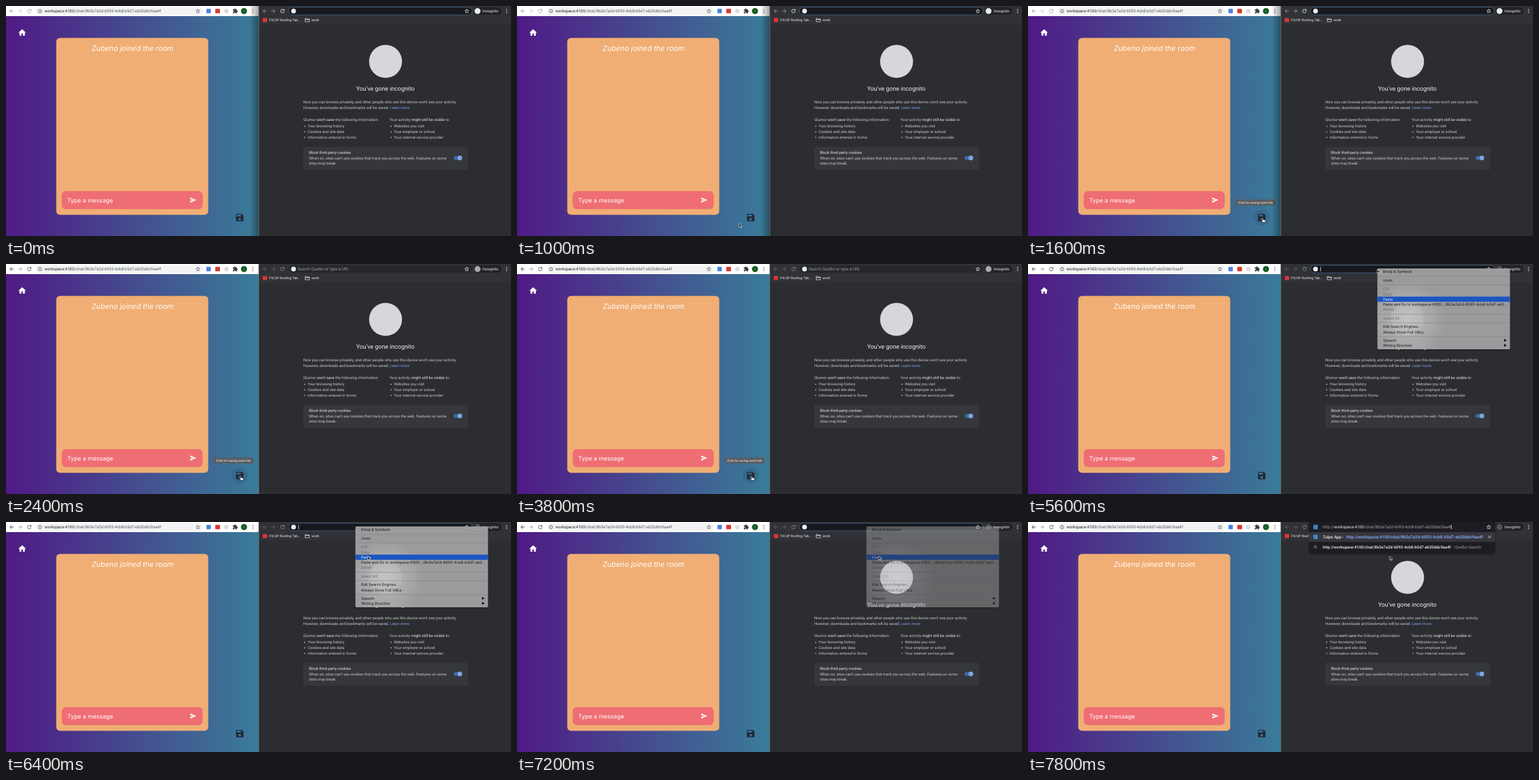
Animation of 800 by 364 pixels, one loop 8 s. Source, as an HTML page:

```html
<!DOCTYPE html>
<html lang="en">
<head>
<meta charset="utf-8">
<title>Sharing a room link</title>
<style>
  html, body { margin: 0; width: 100%; height: 100%; overflow: hidden; background: #2c2d31; }
  svg { display: block; width: 100%; height: 100%; }
  text { font: 6.04px Roboto, "Open Sans", sans-serif; fill: #c9cacd; text-rendering: geometricPrecision; white-space: pre; }
  .url { font-size: 6.48px; }
  .chat { font-family: Inter, Lato, sans-serif; fill: #fff; }
  .menu text { font: 5.85px Inter, Lato, sans-serif; fill: #111; }
  .menu .off { fill: #6d6d70; }
  .menu .on { fill: #fff; }
  .strong { fill: #eceef0; }
  .line { fill: none; stroke: currentColor; stroke-width: .8; }
  .icon { fill: currentColor; }
  #rightNav { --back: .5; }
</style>
</head>
<body>
<svg viewBox="0 0 800 364" preserveAspectRatio="none">
  <defs>
    <linearGradient id="sky"><stop stop-color="#501a85"/><stop offset="1" stop-color="#3a7c99"/></linearGradient>
    <linearGradient id="edge"><stop stop-opacity="0"/><stop offset="1" stop-opacity=".35"/></linearGradient>
    <radialGradient id="glass" gradientUnits="userSpaceOnUse" cx="601" cy="88" r="60">
      <stop stop-color="#c4c4c6"/><stop offset=".35" stop-color="#b8b8ba"/><stop offset="1" stop-color="#a0a0a2"/>
    </radialGradient>
    <filter id="shade" x="-20%" y="-20%" width="140%" height="140%">
      <feDropShadow dx="0" dy="1" stdDeviation="1.5" flood-opacity=".35"/>
    </filter>
    <path id="arrow" d="M20 11H7.83l5.59-5.59L12 4l-8 8 8 8 1.41-1.41L7.83 13H20z"/>
    <path id="reload" d="M17.65 6.35C16.2 4.9 14.21 4 12 4c-4.42 0-8 3.58-8 8s3.58 8 8 8c3.73 0 6.84-2.55 7.73-6h-2.08c-.82 2.33-3.04 4-5.65 4-3.31 0-6-2.69-6-6s2.69-6 6-6c1.66 0 3.14.69 4.22 1.78L13 11h7V4z"/>
    <path id="star" d="M0-3.2 .9-1 3.2-.9 1.4.6 2 2.9 0 1.6-2 2.9-1.4.6-3.2-.9-.9-1z"/>
    <g id="nav">
      <use href="#arrow" transform="translate(4.2 3.2) scale(.4)" style="opacity:var(--back, 1)"/>
      <use href="#arrow" transform="translate(27.3 3.2) scale(-.4 .4)" opacity=".5"/>
      <use href="#reload" transform="translate(32.2 3.2) scale(.4)"/>
    </g>
    <g id="dots"><circle cy="-2.5" r=".8"/><circle r=".8"/><circle cy="2.5" r=".8"/></g>
  </defs>

  <!-- Left window: chat room -->
  <rect width="400" height="364" fill="url(#sky)"/>
  <rect width="400" height="16" fill="#fff"/>
  <use id="leftNav" href="#nav" class="icon"/>
  <rect x="47" y="2" width="265" height="12" rx="6" fill="#f1f3f4"/>
  <g color="#5f6368">
    <circle class="line" cx="54" cy="8" r="2.7"/>
    <path class="line" d="M54 7.5v2M54 6v.8"/>
    <use class="line" href="#star" x="304" y="8"/>
    <use class="icon" href="#dots" x="391" y="8"/>
  </g>
  <text x="61" y="10.3" style="font-size:6.42px" id="leftUrl"></text>
  <rect x="317.5" y="4.5" width="7" height="7" rx="1" fill="#4a80dc"/>
  <rect x="331.5" y="4.5" width="7.5" height="7" rx="1" fill="#d8382f"/>
  <circle cx="349" cy="8" r="3.6" fill="#dcdcde"/>
  <path transform="translate(358.6 3.4) scale(.38)" fill="#3c4043" d="M20.5 11H19V7c0-1.1-.9-2-2-2h-4V3.5a2.5 2.5 0 0 0-5 0V5H4c-1.1 0-2 .9-2 2v3.8h1.5a2.7 2.7 0 0 1 0 5.4H2V20c0 1.1.9 2 2 2h3.8v-1.5a2.7 2.7 0 0 1 5.4 0V22H17c1.1 0 2-.9 2-2v-4h1.5a2.5 2.5 0 0 0 0-5z"/>
  <circle cx="377" cy="8" r="4.8" fill="#0d5a22"/>
  <text x="376.2" y="9.8" style="font-size:5px;fill:#b9dcc0">l</text>

  <path transform="translate(18.4 35) scale(.6)" fill="#fff" d="M10 20v-6h4v6h5v-8h3L12 3 2 12h3v8z"/>
  <rect x="79.6" y="50.6" width="240.8" height="279.8" rx="6" fill="#f0ae74"/>
  <text class="chat" x="200.5" y="71" text-anchor="middle" style="font-size:11.5px;font-style:italic">Zubeno joined the room</text>
  <rect x="88.2" y="293" width="223.4" height="28.4" rx="6.5" fill="#ee6e73"/>
  <text class="chat" x="97" y="310.6" style="font-size:9.4px">Type a message</text>
  <path transform="translate(291 301.5) scale(.46)" fill="#fff" d="M2 21 23 12 2 3v7l15 2-15 2z"/>
  <circle id="hover" cx="370" cy="335" r="12.5" fill="#123" opacity=".12"/>
  <path transform="translate(362.3 327) scale(.66)" fill="#222a38" fill-rule="evenodd" d="M17 3H5a2 2 0 0 0-2 2v14a2 2 0 0 0 2 2h14a2 2 0 0 0 2-2V7zM12 19a3 3 0 1 1 0-6 3 3 0 0 1 0 6zM15 9H5V5h10z"/>
  <g id="tip">
    <rect x="329" y="306.2" width="63" height="9.6" rx="1.8" fill="#5b5c60"/>
    <text x="360.5" y="312.6" text-anchor="middle" style="font-size:4.9px;fill:#fff">Click for saving room link</text>
  </g>
  <rect id="windowShade" x="386" width="14" height="364" fill="url(#edge)"/>

  <!-- Right window: private tab -->
  <rect x="400" width="400" height="364" fill="#2c2d31"/>
  <rect x="401" width="399" height="29" fill="#313236"/>
  <rect x="400" width="1" height="364" fill="#626669"/>
  <use id="rightNav" href="#nav" x="401" class="icon"/>
  <g color="#dfe1e5">
    <rect id="bar" x="447.5" y="2" width="291" height="12" rx="6"/>
    <circle cx="455.5" cy="8" r="3.8" fill="#e9edf6"/>
    <text id="hint" class="url" x="462" y="10.4" style="fill:#9a9ca0">Search Quelbo or type a URL</text>
    <path id="caret" d="M463.5 4.5v7" stroke="#fff" stroke-width=".7"/>
    <use class="line" href="#star" x="730" y="8"/>
    <rect x="741" y="2" width="44" height="12" rx="6" fill="#222327"/>
    <circle id="badge" cx="747" cy="8" r="4.7"/>
    <text class="strong" x="755" y="10.3" style="font-size:6px">Incognito</text>
    <use class="icon" href="#dots" x="793" y="8"/>
    <rect x="406.7" y="19" width="7" height="6.5" rx=".8" fill="#d9343a"/>
    <text class="strong" x="417" y="24" style="font-size:5.4px">FX/UP Roofing Tab…</text>
    <path class="line" d="M474 19.7h2.4l.8 1h3.5v4.3H474zM474 21.5h6.7"/>
    <text class="strong" x="484" y="24" style="font-size:5.6px">work</text>
  </g>

  <circle cx="601.3" cy="87.7" r="26.1" fill="#d6d6db"/>
  <text class="strong" x="601" y="134" text-anchor="middle" style="font-size:9.54px">You've gone incognito</text>
  <text x="471" y="154.4">Now you can browse privately, and other people who use this device won't see your activity.</text>
  <text x="471" y="162.8">However, downloads and bookmarks will be saved. <tspan fill="#78a4ee">Learn more</tspan></text>
  <text x="471" y="182.2">Glumor <tspan class="strong">won't save</tspan> the following information:</text>
  <text x="607.6" y="182.2">Your activity <tspan class="strong">might still be visible</tspan> to:</text>
  <g id="lists"></g>
  <rect x="471" y="222.7" width="261" height="36.3" rx="2" fill="#36373c"/>
  <text class="strong" x="480" y="234.3">Block third-party cookies</text>
  <text x="480" y="242.8">When on, sites can't use cookies that track you across the web. Features on some</text>
  <text x="480" y="251.4">sites may break.</text>
  <rect x="709" y="237.5" width="13" height="6" rx="3" fill="#41699f"/>
  <circle cx="719" cy="240.5" r="3.7" fill="#7ba5e8"/>

  <g id="menu" class="menu">
    <rect x="553.5" y="7" width="210" height="128" rx="2" fill="url(#glass)" filter="url(#shade)"/>
    <rect x="553.5" y="51.6" width="210" height="8.2" fill="#1c57c8"/>
    <path d="M553.5 19.7h210M553.5 33h210M553.5 79.5h210M553.5 93h210M553.5 115h210" stroke="#89898c" stroke-width=".7"/>
    <path d="M754 118.5l4.5 2.3-4.5 2.3zM754 126.5l4.5 2.3-4.5 2.3z" fill="#111"/>
  </g>

  <g id="results">
    <rect x="445" y="-4" width="295" height="54" rx="4" fill="#1e1f22" filter="url(#shade)"/>
    <rect x="445" y="16" width="295" height="15.5" fill="#36373c"/>
    <rect x="452" y="4.5" width="7" height="7" fill="#3e86c6"/>
    <rect x="452" y="20.2" width="7" height="7" fill="#3e86c6"/>
    <text class="url" x="467" y="10.3" id="typedUrl"></text>
    <path d="M670.8 4.5v7" stroke="#fff" stroke-width=".7"/>
    <use class="line" color="#dfe1e5" href="#star" x="730" y="8"/>
    <text class="url strong" x="467" y="26" style="font-weight:500">Tulpo App - </text>
    <text x="504" y="26" style="font-size:6.74px;font-weight:700;fill:#809ff0" id="matchUrl"></text>
    <path class="line" color="#e8eaed" d="M729 21.5l4.4 4.4M733.4 21.5l-4.4 4.4"/>
    <circle class="line" color="#a5a7ab" cx="455" cy="39" r="1.8"/>
    <path class="line" color="#a5a7ab" d="M456.3 40.3l2 2"/>
    <text x="467" y="42" style="font-size:6.37px;font-weight:500" id="searchUrl"></text>
    <text x="672.5" y="42" class="url" style="fill:#9a9ca0">- Quelbo Search</text>
  </g>

  <g id="cursor" stroke="#fff" stroke-width=".6" stroke-linejoin="round">
    <path id="pointer" d="M0 0v6.2l1.5-1.3 1 2.2 1.1-.5-1-2.1h2z" fill="#111"/>
    <path id="hand" d="M-.7.7q.7-1 1.4 0v2.5l2.8.6q.7.2.6 1L3.6 7.5H.2L-2 4.7q.2-1 1.3-.2z" fill="#fff" stroke="#111"/>
  </g>
</svg>
<script>
const $ = id => document.getElementById(id);
const LOOP = 8000, STEP = 200;
const HOST = 'workspace:4100', ROOM = '/chat/8b3e7a2d-6093-4cb8-b5d7-eb20ddc9aa4f';

function add(parent, tag, attrs, content = '') {
  const el = document.createElementNS('http://www.w3.org/2000/svg', tag);
  for (const key in attrs) el.setAttribute(key, attrs[key]);
  el.textContent = content;
  return parent.appendChild(el);
}

function spans(id, parts) {
  for (const [content, color] of parts) add($(id), 'tspan', { fill: color }, content);
}

spans('leftUrl', [[HOST, '#202124'], [ROOM, '#55585c']]);
spans('typedUrl', [['http://', '#a0a2a6'], [HOST, '#f1f3f4'], [ROOM, '#a0a2a6']]);
spans('searchUrl', [['http://' + HOST + ROOM, '#f1f3f4']]);
$('matchUrl').textContent = 'http://' + HOST + ROOM;

[[471, ['Your browsing history', 'Cookies and site data', 'Information entered in forms']],
 [607.6, ['Websites you visit', 'Your employer or school', 'Your internet service provider']]
].forEach(([x, items]) => items.forEach((item, i) => {
  const y = 192.4 + i * 8.7;
  add($('lists'), 'circle', { cx: x + 2.3, cy: y - 2, r: .9, fill: '#c9cacd' });
  add($('lists'), 'text', { x: x + 7, y }, item);
}));

[[14.4, 'Emoji & Symbols'], [27.8, 'Undo'], [41.3, 'Cut', 'off'], [49.5, 'Copy', 'off'],
 [57.8, 'Paste', 'on'], [66, `Paste and Go to ${HOST}/.../${ROOM.slice(6, 33)}...`],
 [74.2, 'Delete', 'off'], [87.8, 'Select All', 'off'], [101.3, 'Edit Search Engines...'],
 [109.5, 'Always Show Full URLs'], [123, 'Speech'], [131, 'Writing Direction']
].forEach(([y, label, state = '']) => add($('menu'), 'text', { x: 562.5, y, class: state }, label));

// time, x, y
const path = [
  [400, 334, 370], [1000, 352, 344], [1400, 372, 335], [3800, 372, 335],
  [4200, 405, 262], [4600, 500, 85], [5000, 553, 8.5], [5600, 553, 8.5],
  [6200, 573, 54], [8000, 573, 54]
];
const smooth = p => p * p * (3 - 2 * p);

function cursorAt(t) {
  const i = path.findIndex(point => t < point[0]);
  if (i < 1) return path[0].slice(1);
  const [t0, x0, y0] = path[i - 1], [t1, x1, y1] = path[i];
  const p = smooth((t - t0) / (t1 - t0));
  return [x0 + (x1 - x0) * p, y0 + (y1 - y0) * p];
}

const show = (id, visible) => $(id).style.display = visible ? '' : 'none';

function draw(t) {
  const within = (from, to) => t >= from && t < to;
  const clicked = t >= 1800;
  const barFocus = !within(1800, 5400);
  const [x, y] = cursorAt(t);
  const onButton = within(1400, 4000);

  $('cursor').setAttribute('transform', `translate(${x} ${y})`);
  show('pointer', !onButton);
  show('hand', onButton);
  show('hover', onButton);
  show('tip', within(1600, 4000));

  show('windowShade', !clicked);
  $('leftNav').style.color = clicked ? '#505357' : '#a3a6aa';
  $('rightNav').style.color = clicked ? '#8a8c90' : '#e8eaed';
  $('bar').setAttribute('fill', barFocus ? '#18191c' : '#27282c');
  $('bar').setAttribute('stroke', barFocus ? '#3d5878' : 'none');
  $('badge').setAttribute('fill', !clicked ? '#e8eaed' : barFocus ? '#55575c' : '#a9abb0');
  show('hint', !barFocus);
  show('caret', within(500, 1000) || within(5400, 6600));

  show('menu', within(5600, 7400));
  $('menu').style.opacity = t < 7200 ? .96 : .5;
  show('results', t >= 7400);
}

const start = performance.now();
function tick() {
  const t = (performance.now() - start) % LOOP;
  draw(Math.floor(t / STEP) * STEP);
  requestAnimationFrame(tick);
}
tick();
</script>
</body>
</html>
```
